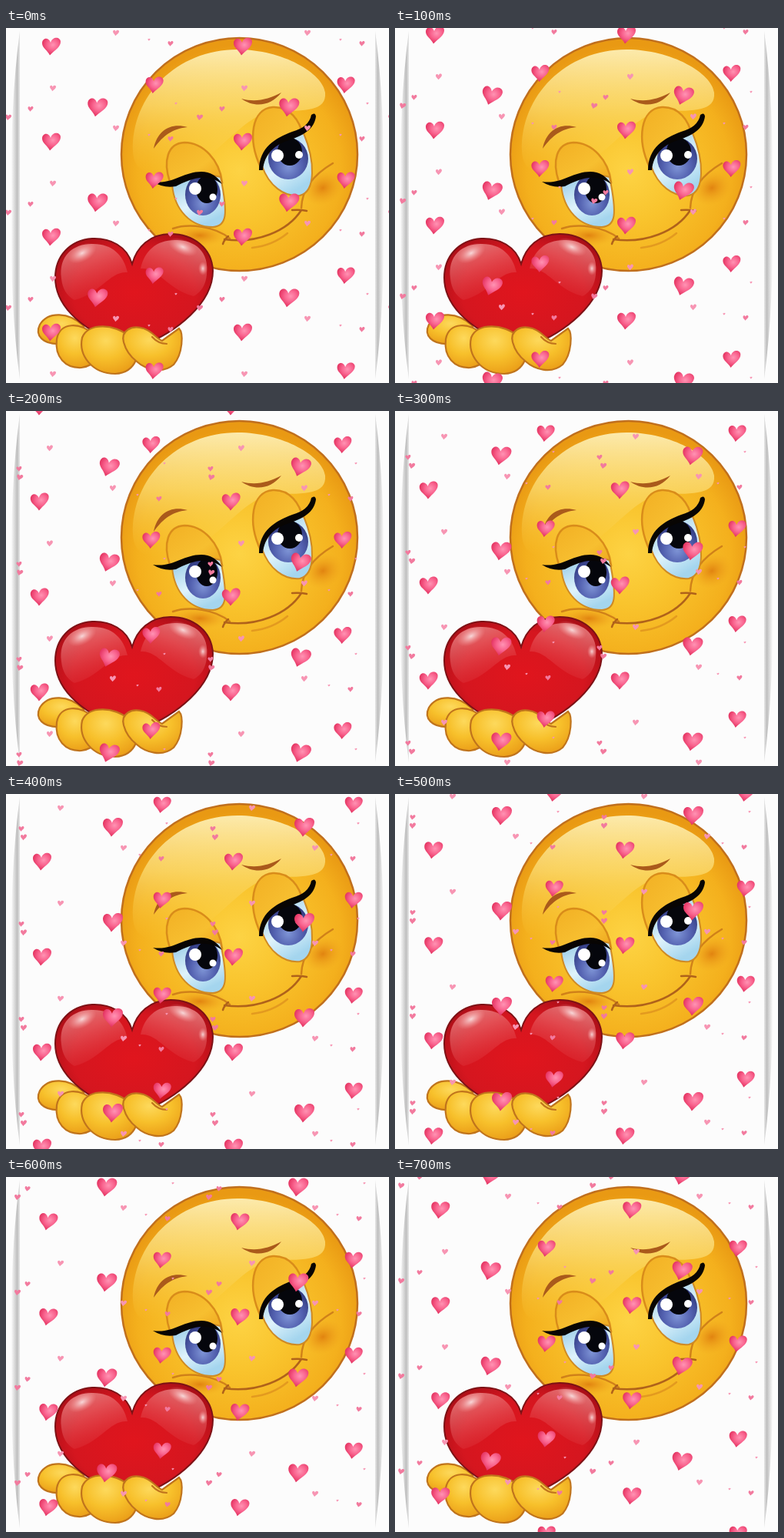
An HTML page for the animation above (800 ms loop, 498 by 462 pixels).

```html
<!DOCTYPE html>
<html lang="en">
<head>
<meta charset="utf-8">
<title>Smiley with a heart</title>
<style>
html, body { margin: 0; width: 100%; height: 100%; overflow: hidden; background: #fcfcfc; }
svg { display: block; width: 498px; height: 462px; }
.line { fill: none; stroke-linecap: round; stroke-linejoin: round; }
.finger { fill: url(#skin); stroke: #c0741c; stroke-width: 2.2; }
.lid { fill: url(#lid); stroke: #d98c1a; stroke-width: 2.5; }
.white { fill: url(#white); stroke: #cf8a24; stroke-width: 2; }
</style>
</head>
<body>
<svg viewBox="0 0 498 462">
<defs>
  <linearGradient id="shade">
    <stop offset="0" stop-color="#aaa" stop-opacity="0"/>
    <stop offset=".7" stop-color="#aaa" stop-opacity=".75"/>
    <stop offset="1" stop-color="#bbb" stop-opacity=".35"/>
  </linearGradient>
  <radialGradient id="face" cx=".5" cy=".57" r=".54">
    <stop offset="0" stop-color="#fdd344"/>
    <stop offset=".4" stop-color="#f9c42d"/>
    <stop offset=".8" stop-color="#f4b01d"/>
    <stop offset="1" stop-color="#e99913"/>
  </radialGradient>
  <linearGradient id="shine" x2="0" y2="1">
    <stop offset="0" stop-color="#fdeeb4" stop-opacity=".95"/>
    <stop offset=".45" stop-color="#fbdc72" stop-opacity=".75"/>
    <stop offset="1" stop-color="#f9c838" stop-opacity="0"/>
  </linearGradient>
  <linearGradient id="lid" x1="0" y1="0" x2="1" y2="1">
    <stop offset="0" stop-color="#f2b024"/>
    <stop offset=".6" stop-color="#f7bf30"/>
    <stop offset="1" stop-color="#eda41c"/>
  </linearGradient>
  <linearGradient id="white" x1="0" y1="0" x2=".5" y2="1">
    <stop offset="0" stop-color="#8fc6e4"/>
    <stop offset=".6" stop-color="#dff3fb"/>
    <stop offset="1" stop-color="#a4d5ee"/>
  </linearGradient>
  <radialGradient id="iris" cx=".5" cy=".7" r=".7">
    <stop offset="0" stop-color="#7f95d6"/>
    <stop offset=".5" stop-color="#5361b0"/>
    <stop offset="1" stop-color="#2c3478"/>
  </radialGradient>
  <radialGradient id="blush">
    <stop offset="0" stop-color="#e0810f" stop-opacity=".95"/>
    <stop offset="1" stop-color="#f0a31c" stop-opacity="0"/>
  </radialGradient>
  <radialGradient id="red" cx=".5" cy=".52" r=".6">
    <stop offset="0" stop-color="#e0151d"/>
    <stop offset=".65" stop-color="#d5161f"/>
    <stop offset="1" stop-color="#a80e17"/>
  </radialGradient>
  <linearGradient id="gloss" x2=".4" y2="1">
    <stop offset="0" stop-color="#f49a9a" stop-opacity=".85"/>
    <stop offset="1" stop-color="#e2434a" stop-opacity=".2"/>
  </linearGradient>
  <radialGradient id="glow">
    <stop offset="0" stop-color="#fff" stop-opacity=".75"/>
    <stop offset="1" stop-color="#ffb0b0" stop-opacity="0"/>
  </radialGradient>
  <radialGradient id="skin" cx=".45" cy=".3" r=".75">
    <stop offset="0" stop-color="#fdd95c"/>
    <stop offset=".5" stop-color="#f7c02b"/>
    <stop offset="1" stop-color="#ea9c17"/>
  </radialGradient>
  <radialGradient id="pink" cx=".58" cy=".4" r=".6">
    <stop offset="0" stop-color="#ff93b3"/>
    <stop offset=".5" stop-color="#f9648f"/>
    <stop offset="1" stop-color="#e3315f"/>
  </radialGradient>
  <path id="heart" d="M-2 12.500C-5 6-12 3-12-3C-12-10-4-12-1-4C2-13 12-11 12-5C12 2 4 6-2 12.500Z"/>
  <path id="edge" d="M18 4Q5 100 7 231Q5 360 18 457Z" fill="url(#shade)"/>
  <path id="lobe" d="M72 326C68 296 88 281 111 281C137 280 153 295 158 318C135 316 124 345 89 354Q74 346 72 326Z" fill="url(#gloss)"/>
</defs>

<use href="#edge"/>
<use href="#edge" transform="matrix(-1 0 0 1 498 0)"/>

<ellipse cx="303.500" cy="164.500" rx="153.500" ry="151.500" fill="url(#face)" stroke="#c06f1d" stroke-width="2.500"/>
<path d="M165 160C163 88 222 28 301 28C360 28 412 59 415 84C417 108 390 108 350 108C300 112 270 190 200 190C176 190 166 180 165 160Z" fill="url(#shine)"/>

<!-- cheeks and mouth -->
<ellipse cx="252" cy="270" rx="36" ry="14" fill="url(#blush)"/>
<ellipse cx="412" cy="208" rx="27" ry="22" transform="rotate(-25 412 208)" fill="url(#blush)"/>
<g class="line" stroke="#d08119" stroke-width="2.500">
  <path d="M217 261C238 254 272 258 291 274"/>
  <path d="M425 176C408 186 385 204 384 234"/>
  <path d="M320 286Q347 283 366 267" stroke="#e39a1f"/>
</g>
<g class="line" stroke="#b0621a" stroke-width="2.500">
  <path d="M284 275C325 281 366 265 384 237"/>
  <path d="M282 281Q284 275 289 271M372 237Q382 236 391 238"/>
</g>

<!-- brows -->
<g fill="#aa5a1b">
  <path d="M192 157C197 133 214 123 236 129C217 131 205 139 192 157Z"/>
  <path d="M306 92C325 97 341 93 358 84C344 102 323 104 306 92Z"/>
</g>

<!-- left eye -->
<path class="lid" d="M213 200C204 173 210 150 232 149C256 149 278 172 281 201Z"/>
<path class="white" d="M216 204C219 237 240 259 269 259C287 258 289 243 279 194C255 187 238 198 216 204Z"/>
<ellipse cx="256" cy="217" rx="23" ry="27" fill="url(#iris)"/>
<ellipse cx="261" cy="210" rx="14" ry="18" fill="#05060c"/>
<circle cx="246" cy="209" r="8" fill="#fff"/>
<circle cx="269" cy="220" r="4.500" fill="#fff"/>
<path d="M191 200C217 204 230 187 254 187Q271 187 281 203C259 187 237 198 221 206Q205 209 191 200Z" fill="#080503"/>

<!-- right eye -->
<path class="lid" d="M331 181C314 145 319 105 347 103C369 102 382 120 386 140Z"/>
<path class="white" d="M333 180C342 205 361 220 382 218C403 213 402 173 387 137C364 144 337 156 333 180Z"/>
<ellipse cx="367" cy="170" rx="26" ry="27" fill="url(#iris)"/>
<ellipse cx="369" cy="161" rx="16" ry="18" fill="#05060c"/>
<circle cx="353" cy="166" r="8" fill="#fff"/>
<circle cx="381" cy="165" r="5" fill="#fff"/>
<path d="M329 185C329 155 351 143 372 135Q394 129 397 113Q402 109 403 115C401 130 390 138 371 145C350 151 336 163 334 185Z" fill="#080503"/>

<!-- hand behind the heart -->
<path class="finger" d="M100 387C82 370 55 368 44 386C37 400 48 412 70 411L110 409Z"/>
<path class="finger" d="M113 398C97 383 70 382 66 405C63 428 77 443 98 442Q112 440 119 430Z"/>

<!-- big heart -->
<path d="M164 307C157 284 136 273 112 274C83 276 64 297 64 325C64 356 88 388 152 414L175 414C222 396 269 358 269 316C268 286 243 268 214 268C187 268 170 285 164 307Z" fill="url(#red)" stroke="#7d1115" stroke-width="2"/>
<use href="#lobe"/>
<use href="#lobe" transform="matrix(-1 0 0 1 333 -5)"/>
<ellipse cx="99" cy="293" rx="20" ry="11" transform="rotate(-28 99 293)" fill="url(#glow)"/>
<ellipse cx="230" cy="285" rx="20" ry="10" transform="rotate(24 230 285)" fill="url(#glow)"/>
<ellipse cx="256" cy="313" rx="6" ry="9" fill="url(#glow)"/>

<!-- front fingers -->
<path class="finger" d="M158 400C143 386 107 382 99 403C94 426 112 450 142 450Q162 449 169 432Z"/>
<path class="finger" d="M153 409C149 394 163 386 179 391C191 395 195 404 203 407L225 391C231 397 230 424 218 438C203 451 181 444 170 434Q157 424 153 409Z"/>
<path class="line" d="M190 402Q198 411 209 411" stroke="#c0741c" stroke-width="2.200"/>

<g id="rain"></g>
</svg>
<script>
const TILE_W = 249, TILE_H = 124, RISE = 15, STEP = 100, STEPS = 8;

// Three sideways sways: x and tilt (degrees) per step, y at step 0
const sways = [
  { x: [59, 52, 44, 44, 47, 50, 55, 59], tilt: [0, 0, -4, -4, 0, 4, 6, 4], y: 23 },
  { x: [119, 126, 134, 138, 139, 139, 131, 124], tilt: [4, 12, 12, 5, 0, 0, 4, 10], y: 102 },
  { x: [193, 189, 189, 196, 203, 207, 203, 197], tilt: [2, -2, -2, 2, 4, 4, 4, 3], y: 73 }
];

// [sway, dx, dy, width, fill]
const kinds = [
  [0, 0, 0, 24, "url(#pink)"],
  [1, 0, 0, 26, "url(#pink)"],
  [2, 0, 0, 23, "url(#pink)"],
  [2, -132, 5, 8, "#f795b3"],
  [2, -50, 57, 8, "#f795b3"],
  [1, -116, 14, 8, "#f27a9e"],
  [0, -27, 82, 7, "#f27a9e"],
  [0, 155, -3, 7, "#f27a9e"],
  [0, 162, 75, 3, "#f795b3"],
  [0, 127, -8, 3, "#f795b3"]
];

const rain = document.getElementById("rain");
const hearts = [];
for (const [sway, dx, dy, width, fill] of kinds)
  for (let col = -1; col < 3; col++)
    for (let row = -1; row < 6; row++) {
      const el = document.createElementNS("http://www.w3.org/2000/svg", "use");
      el.setAttribute("href", "#heart");
      el.setAttribute("fill", fill);
      rain.append(el);
      hearts.push({ el, sway: sways[sway], dx: dx + col * TILE_W, dy: dy + row * TILE_H, scale: width / 24 });
    }

let shown = -1;
function draw(now) {
  const k = Math.floor(now / STEP) % STEPS;
  if (k === shown) return;
  shown = k;
  for (const { el, sway, dx, dy, scale } of hearts) {
    const x = sway.x[k] + dx, y = sway.y - RISE * k + dy;
    el.setAttribute("transform", `translate(${x} ${y}) rotate(${sway.tilt[k]}) scale(${scale})`);
  }
}

let start;
function tick(now) {
  start ??= now;
  draw(now - start);
  requestAnimationFrame(tick);
}
draw(0);
requestAnimationFrame(tick);
</script>
</body>
</html>
```
